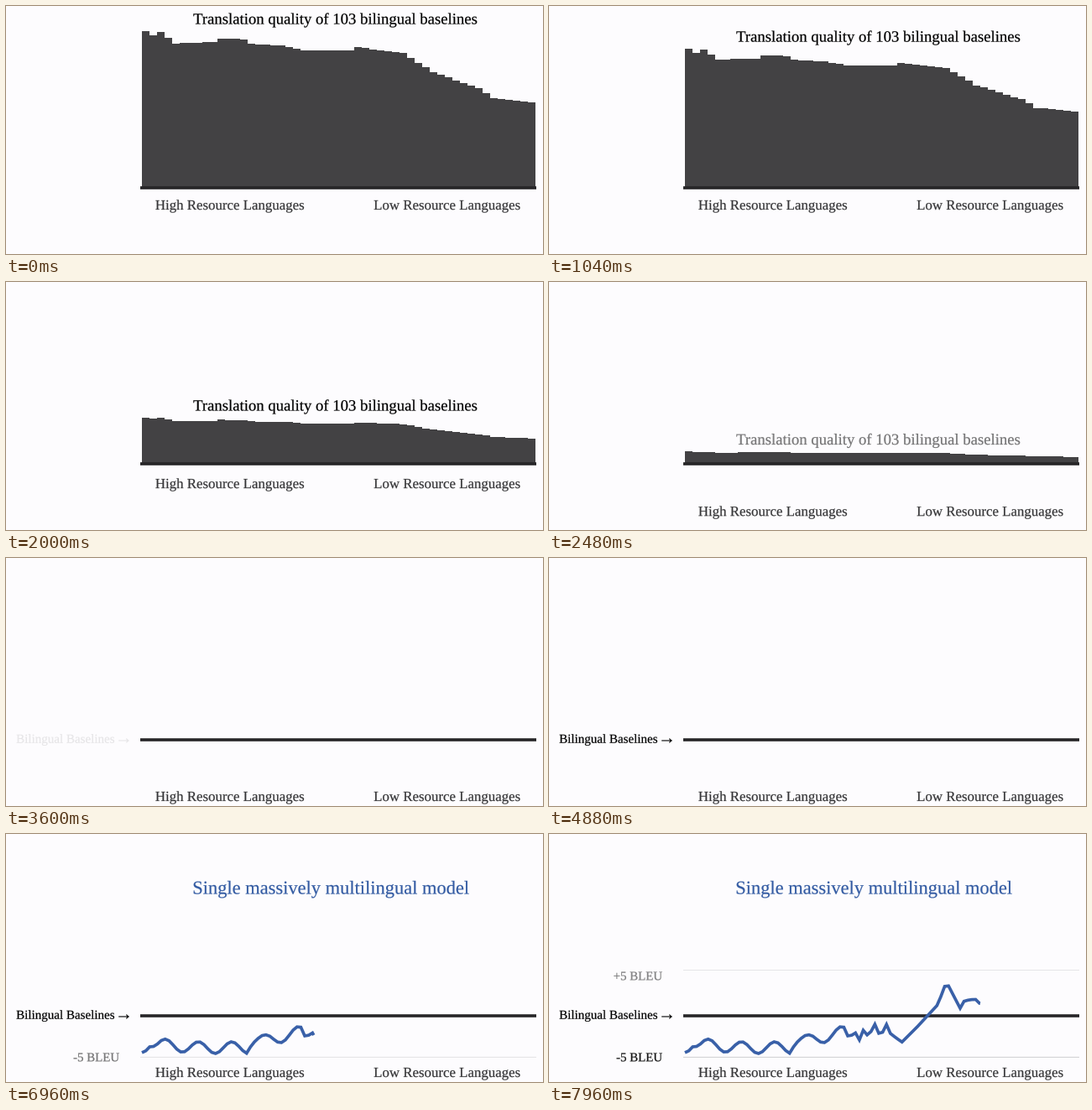
These frames come from a looping animation (640 px wide and 296 px high, 8000 ms). A matplotlib script:

```python
import numpy as np
import matplotlib.pyplot as plt
from matplotlib.animation import FuncAnimation
from matplotlib.patches import PathPatch
from matplotlib.textpath import TextPath
from matplotlib.transforms import Affine2D

W, H, DPI = 640, 296, 100
STEP, FRAMES = 40, 200
PX = 72 / DPI  # points per pixel
BG, INK, GREY, TEXT = "#fdfcfe", "#262527", "#434244", "#353537"
BLUE, TITLE_BLUE = "#3960a8", "#335ba3"
LEFT, RIGHT, FLOOR = 162, 631, 216
FONT = {"family": "Liberation Serif"}

fig = plt.figure(figsize=(W / DPI, H / DPI), dpi=DPI, facecolor=BG)
ax = fig.add_axes([0, 0, 1, 1])
ax.set_xlim(0, W)
ax.set_ylim(H, 0)
ax.axis("off")


class Label:
    """Text as an outline, so that it can move and grow by parts of a pixel."""

    def __init__(self, s, x, y, size, color, align=0.5):
        path = TextPath((0, 0), s, size=size, prop=FONT)
        box = path.get_extents()
        self.x, self.y = x, y
        self.anchor = box.x0 + align * box.width
        self.patch = ax.add_patch(PathPatch(path, fc=color, ec=color, lw=0.15, zorder=5))
        self.place()

    def place(self, dx=0, dy=0, scale=1):
        move = Affine2D().translate(-self.anchor, 0).scale(scale, -scale)
        self.patch.set_transform(move.translate(self.x + dx, self.y + dy) + ax.transData)

    def fade(self, alpha):
        self.patch.set_alpha(alpha)


def rule(y, color, px, z):
    return ax.plot([160, 632], [y, y], color=color, lw=px * PX, zorder=z,
                   solid_capstyle="butt", snap=False)[0]


def through(x, points):
    return np.interp(x, *zip(*points))


def ramp(t, start, length):
    return min(max((t - start) / length, 0), 1)


def in_out(u):
    return 2 * u * u if u < 0.5 else 1 - 2 * (1 - u) ** 2


def out(u):
    return 1 - (1 - u) ** 2


# Bars: a plateau that falls away on the low resource side
BARS = 52
heights = through(np.arange(BARS), [
    (0, 186.5), (1, 181), (2, 185.5), (4, 171.5), (9, 173), (10, 177.5),
    (13, 176.5), (14, 171), (18, 169), (21, 163.5), (27, 163.5), (28, 167),
    (32, 162), (34, 160), (38, 137), (44, 118), (46, 106.5), (51, 101.5)])
bars = ax.stairs(FLOOR - heights, np.linspace(LEFT, RIGHT, BARS + 1),
                 baseline=FLOOR, fill=True, color=GREY, lw=0, zorder=2)
rule(217, INK, 3.6, 3)

# Curve: a trend with slow swells on the left and a quick zigzag further on
curve_x = LEFT + 4.62 * np.arange(103)
trend = through(curve_x, [
    (161, 260.5), (171, 247), (180, 251), (229, 255), (287, 255), (293, 245),
    (308, 247), (328, 242), (351, 236), (356, 243), (366, 237), (370, 246),
    (381, 234), (409, 235), (413, 242), (420, 249), (439, 230), (464, 203),
    (471, 182), (476, 181), (490, 208), (495, 199), (508, 197), (514, 203)])
swell = -7 * np.cos(2 * np.pi * (curve_x - 190) / 39.5) * (curve_x < 358)
phase = (curve_x - 374) / 14
zigzag = 8 * (4 * np.abs(phase - np.round(phase)) - 1) * (abs(curve_x - 391.5) < 21)
curve_y = trend + swell + zigzag
curve, = ax.plot([], [], color=BLUE, lw=3.7 * PX, zorder=4,
                 solid_capstyle="butt", solid_joinstyle="miter")

title = Label("Translation quality of 103 bilingual baselines", 392.3, 21.5, 18.72, "black")
names = [Label("High Resource Languages", 266.7, 243, 16.85, TEXT),
         Label("Low Resource Languages", 525.6, 243, 16.85, TEXT)]
model = Label("Single massively multilingual model", 387.7, 71.5, 22.45, TITLE_BLUE)

# Baseline note, which pulses around its middle
NOTE_X, NOTE_Y = 80, 216
note = [Label("Bilingual Baselines", 70.8, 220.7, 15.05, "black"),
        Label("\u2192", 140.5, 221.4, 20.8, "black")]

# Each tick: its text, its line and the time its fade begins
ticks = [(Label("-5 BLEU", 134.8, 271.3, 14.9, "#111111", align=1),
          rule(266.4, "#cfcfd1", 1, 1), 6380),
         (Label("+5 BLEU", 134.8, 174.3, 14.9, "#111111", align=1),
          rule(162.5, "#cfcfd1", 1, 1), 7430)]


def update(i):
    t = i * STEP

    # Bars sink to the baseline and carry the title down
    sink = in_out(ramp(t, 440, 2520))
    bars.set_data(values=FLOOR - heights * (1 - sink))
    title.place(dy=186 * sink)
    title.fade(1 - ramp(t, 2160, 640))

    for name in names:
        name.place(dy=47 * in_out(ramp(t, 1820, 1000)))

    pulse = 0.15 * np.sin(np.pi * ramp(t, 3980, 860)) ** 2
    for part in note:
        part.place((part.x - NOTE_X) * pulse, (part.y - NOTE_Y) * pulse, 1 + pulse)
        part.fade(ramp(t, 3560, 500))

    model.fade(ramp(t, 4890, 670))

    for label, line, start in ticks:
        shown = ramp(t, start, 1050)
        label.fade(shown)
        line.set_alpha(shown)

    # Curve is drawn from left to right, slowing down
    tip = LEFT + 470 * out(ramp(t, 5965, 4000))
    done = curve_x < tip
    curve.set_data(np.append(curve_x[done], tip),
                   np.append(curve_y[done], np.interp(tip, curve_x, curve_y)))
    return []


anim = FuncAnimation(fig, update, frames=FRAMES, interval=STEP,
                     repeat=True, repeat_delay=0, init_func=lambda: update(0))
plt.show()
```
